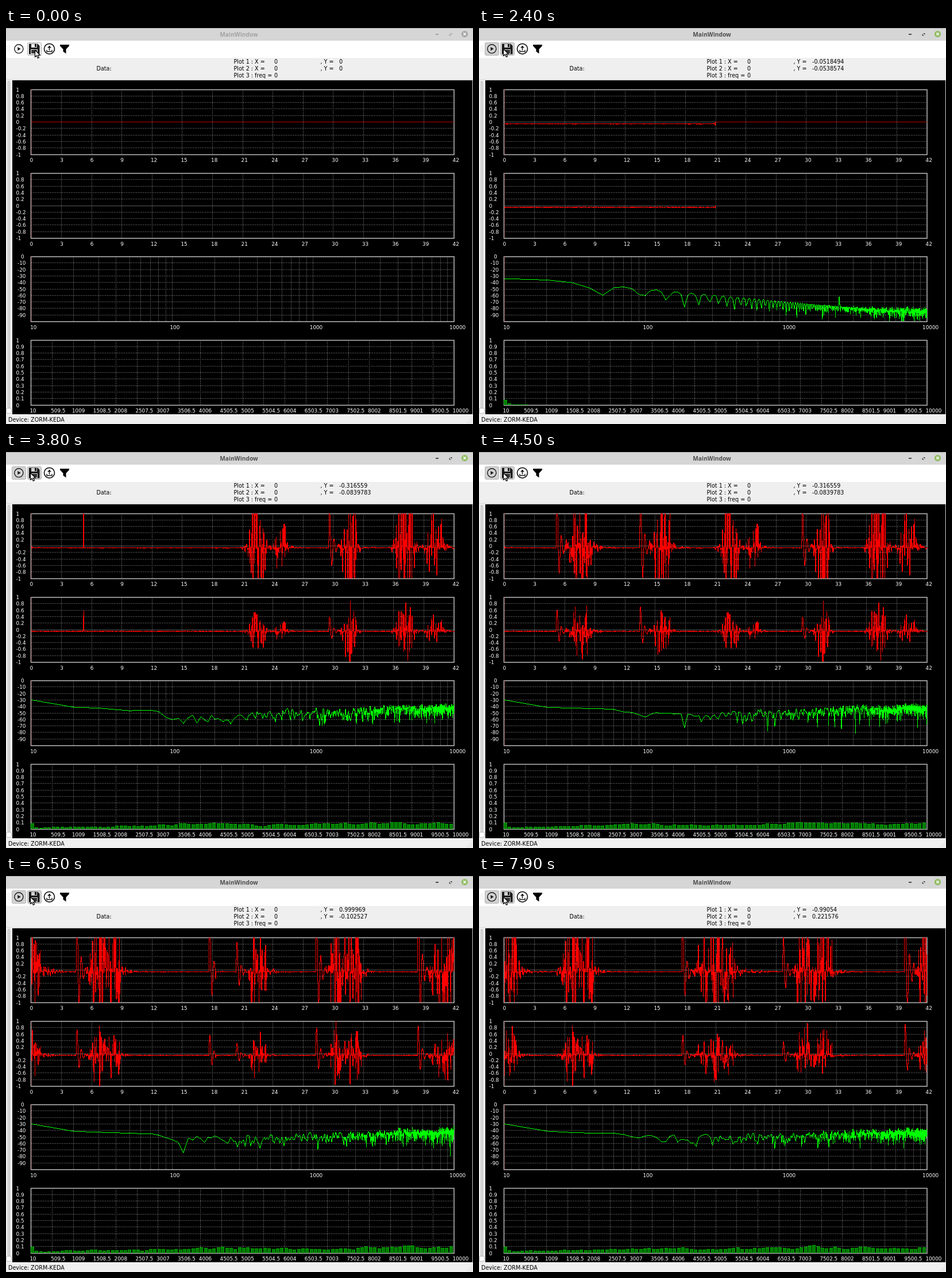
An HTML page with a canvas that plays this animation: 813 px wide and 689 px high, repeating every 8000 ms.

```html
<!DOCTYPE html>
<html>
<head>
<meta charset="utf-8">
<style>
html, body { margin: 0; width: 100%; height: 100%; overflow: hidden; background: #efefef; }
canvas { display: block; }
</style>
</head>
<body>
<canvas id="c" width="813" height="689"></canvas>
<script>
const g = document.getElementById('c').getContext('2d');
const LOOP = 8000, TICK = 100, SPAN = 42, PACKET = SPAN / 16, PERIOD = 127.5;
const L = 44, W = 736, H = 113;
const TOPS = [107, 252.5, 397.5, 543];
const SANS = '"DejaVu Sans", sans-serif';

const clamp = (v, a, b) => Math.min(b, Math.max(a, v));
const lerp = (a, b, w) => a + (b - a) * w;
const ramp = (t, a, b) => clamp((t - a) / (b - a), 0, 1);
const hash = n => { const v = Math.sin(n * 12.9898 + 4.1) * 43758.5453; return v - Math.floor(v); };

// Packets arrive steadily, with one stall while saving starts
const packetsAt = t => t < 3200
  ? clamp(Math.floor((t - 1600) / PERIOD + 1.75), 0, 8)
  : 13 + Math.floor((t - 3200) / PERIOD + .38);

// Noise bursts: start, length, strength
const BURSTS = [
  [21.4, 2.2, .7], [24, 1.6, .45], [30.8, 1.6, 1.1], [36.1, 2.2, 1], [39.2, 1.8, .9], [48.4, 2.4, 1.1],
  [56.7, 2, 1], [63.6, 1.9, 1], [71.5, 1.5, 1.2], [72.8, 2.2, 1], [81.6, 3.5, 1.1], [89.7, 1.9, 1.1],
  [91.3, 1.8, 1], [102.9, 4.2, 1], [112.9, 1.8, 1.2], [114.5, 2.3, 1], [125, 2.6, 1.1]
];

// A burst after a long silence is announced by a click
const CLICKS = BURSTS
  .filter(([a], i) => i && a - BURSTS[i - 1][0] - BURSTS[i - 1][1] > 4)
  .map(([a]) => [a - 1.25, .5 + hash(a) * .9]);

function envelope(s) {
  let amp = 0;
  for (const [a, len, k] of BURSTS) {
    const x = (s - a) / len;
    if (x < -.3 || x > 3) continue;
    const body = x > 0 && x < 1 ? Math.pow(Math.sin(Math.PI * x), .8) : 0;
    const tail = x > .5 ? .4 * Math.exp(-(x - .5) * 3) : .12 * ramp(x, -.3, 0);
    amp = Math.max(amp, k * Math.max(body, tail));
  }
  return amp;
}

function signal(s, id, gain) {
  const n = 2 * hash(id) - 1;
  let v = n * n * n * envelope(s);
  for (const [at, k] of CLICKS) {
    const d = s - at;
    if (d > 0 && d < 2) v += k * Math.sin(d * 15) * Math.exp(-d * 3.5);
  }
  return v * gain - .055 + (hash(id + .5) - .5) * .02;
}

// Newest value at sample i of the ring buffer
function sample(i, p, gain) {
  const u = i / (W * 2) * SPAN;
  const lap = Math.ceil((p - u) / SPAN) - 1;
  return lap < 0 ? 0 : signal(u + lap * SPAN, i + lap * W * 2, gain);
}

// Mean loudness: log10 of frequency, dB
const LEVEL = [[1, -30], [1.3, -41.5], [1.75, -45], [2.1, -52], [3, -50], [3.5, -45], [4, -42]];

function level(f, key) {
  const x = Math.log10(f);
  const i = clamp(LEVEL.findIndex(p => p[0] >= x), 1, LEVEL.length - 1);
  const [a, b] = [LEVEL[i - 1], LEVEL[i]];
  const swell = Math.sin(f / 700 + key * 1.9) * 1.6 * ramp(f, 200, 1500);
  return lerp(a[1], b[1], (x - a[0]) / (b[0] - a[0])) + swell;
}

// Smooth noise, near normal, over the bins
function noise(i, seed) {
  let v = 0;
  for (let k = -1; k < 2; k++)
    v += (hash((i + k) * 1.37 + seed) + hash((i + k) * 2.11 + seed + 7) - 1) * (k ? .7 : 1);
  return v * 1.22;
}

function spectrum(n) {
  const q = Math.max(0, (n - 8) / 8), a = Math.floor(q);
  const w = a ? q - a : Math.sqrt(q), len = Math.min(n, 8) * PACKET / 1000;
  const c = Math.cos(w * Math.PI / 2), s = Math.sin(w * Math.PI / 2);
  const mix = (i, d) => c * noise(i, a * 71 + d) + s * noise(i, a * 71 + 71 + d);
  return Array.from({ length: 1000 }, (_, j) => {
    const f = (j + 1) * 10, m = Math.hypot(mix(j, 0), mix(j, 33)) + 1e-4;
    const loud = k => level(f, k) + 20 * Math.log10(m) * ramp(j, 0, 14);
    if (a) return lerp(loud(a), loud(a + 1), w);
    const peak = 21 * Math.exp(-Math.pow((f - 2380) / 25, 2));
    const quiet = Math.hypot(Math.sin(Math.PI * f * len) / (Math.PI * f), m * Math.pow(10, (peak - 85) / 20));
    return lerp(20 * Math.log10(quiet), loud(1), w);
  });
}

// Crisp one pixel polyline
function trace(n, fx, fy, top, color) {
  g.fillStyle = color;
  let x0 = fx(0), y0 = fy(0);
  for (let i = 1; i < n; i++) {
    const x1 = fx(i), y1 = fy(i);
    const at = x => lerp(y0, y1, ramp(x, x0, x1));
    for (let c = Math.floor(x0); c <= Math.floor(x1) && c <= 780; c++) {
      const p = at(c), q = at(c + 1);
      const lo = Math.min(p, q), hi = Math.max(p, q);
      if (hi < top || lo > top + H) continue;
      const a = Math.floor(Math.max(lo, top)), b = Math.floor(Math.min(hi, top + H));
      g.fillRect(c, a, 1, Math.max(1, b - a));
    }
    x0 = x1; y0 = y1;
  }
}

function text(s, x, y, size, color = '#000', font = SANS, align = 'left', weight = '') {
  g.font = weight + ' ' + size + 'px ' + font;
  g.fillStyle = color;
  g.textAlign = align;
  g.textBaseline = 'alphabetic';
  g.fillText(s, x, y + size * .36);
}

function box(x, y, w, h, color) { g.fillStyle = color; g.fillRect(x, y, w, h); }

function round(x, y, w, h, r, fill, stroke) {
  g.beginPath();
  g.roundRect(x, y, w, h, r);
  g.fillStyle = fill;
  g.fill();
  g.strokeStyle = stroke;
  g.lineWidth = 1;
  g.stroke();
}

function line(pts, color, width = 1, fill) {
  g.beginPath();
  pts.forEach(([x, y], i) => i ? g.lineTo(x, y) : g.moveTo(x, y));
  if (fill) { g.closePath(); g.fillStyle = fill; g.fill(); }
  if (color) { g.strokeStyle = color; g.lineWidth = width; g.stroke(); }
}

function circle(x, y, r, fill, stroke, width = 1.5) {
  g.beginPath();
  g.arc(x, y, r, 0, 7);
  if (fill) { g.fillStyle = fill; g.fill(); }
  if (stroke) { g.strokeStyle = stroke; g.lineWidth = width; g.stroke(); }
}

function dotted(x0, y0, x1, y1, color = '#a0a0a0') {
  g.setLineDash([1, 2]);
  line([[x0, y0], [x1, y1]], color);
  g.setLineDash([]);
}

function axes(k, xs) {
  const top = TOPS[k], px = v => Math.floor(v) + .5;
  for (let i = 1; i < 10; i++) {
    const y = px(top + i * H / 10);
    if (k < 2 && i === 5) line([[L, y], [L + W, y]], '#585858');
    else dotted(L, y, L + W, y);
  }
  xs.forEach(x => dotted(px(x), top, px(x), top + H));
  g.strokeStyle = '#b0b0b0';
  g.lineWidth = 1.6;
  g.strokeRect(43.5, top + .4, 736.5, H);
  if (k < 3) dotted(44.5, top, 44.5, top + H, '#b00000');
  for (let i = 0; i <= 10; i++) {
    if (k === 2 && i === 10) break;
    const s = k === 2 ? -10 * i : k === 3 ? 1 - i / 10 : 1 - i / 5;
    text(String(+s.toFixed(1) || 0), k === 2 ? (i ? 20 : 26) : 17.5, top + .4 + i * H / 10, 8.8, '#fff');
  }
}

function grids() {
  const steps = (count, d) => Array.from({ length: count }, (_, i) => L + (i + 1) * d);
  const label = (s, x, k) => text(String(s), x, TOPS[k] + H + 10.1, 8.8, '#fff');
  for (let k = 0; k < 2; k++) {
    axes(k, steps(13, W / 14));
    for (let i = 0; i < 15; i++) label(i * 3, L + i * W / 14 - 2.4, k);
  }
  const logs = [];
  for (let d = 0; d < 3; d++)
    for (let m = 1; m < 10; m++) if (d + m > 1) logs.push(L + (d + Math.log10(m)) * W / 3);
  axes(2, logs);
  for (let d = 0; d < 4; d++) label(10 ** (d + 1), 42.2 + 243.3 * d, 2);
  axes(3, steps(19, W / 20));
  for (let i = 0; i < 21; i++) label(10 + i * 499.5, L + i * W / 20 - 2.6, 3);
}

function bars(db) {
  const base = Math.floor(TOPS[3] + H), amp = db.map(v => Math.pow(10, v / 20));
  for (let k = 0; k < 100; k++) {
    // Neighbouring bands smooth each bar
    const part = amp.slice(k ? k * 10 - 8 : 0, k ? k * 10 + 18 : 10);
    const h = Math.round(part.reduce((a, b) => a + b) / part.length * 12.3 * H);
    const x = Math.round(43 + k * W / 100);
    if (h) box(x, base - h, 6, h, '#00a400');
    if (h > 2) box(x + 1, base - h + 1, 4, h - 1, '#007a00');
  }
}

function plots(n) {
  const p = n * PACKET, end = Math.round(Math.min(p / SPAN, 1) * W);
  box(11, 91, 801, 581, '#000');
  grids();
  if (end < W) box(L + end, 163, W - end, 1, '#b40000');
  if (!n) return;
  [2.4, .95].forEach((gain, k) => trace(end * 2 + 1, i => L + i / 2,
    i => TOPS[k] + (1 - sample(i, p, gain)) * H / 2, TOPS[k], '#f00'));
  const db = spectrum(n);
  trace(1000, i => L + Math.log10(i + 1) * W / 3, i => TOPS[2] - db[i] * H / 100, TOPS[2], '#0f0');
  bars(db);
}

function titleBar(active) {
  const ink = active ? '#4c4c4c' : '#a2a2a2';
  box(0, 0, 813, 22, '#d6d6d6');
  box(0, 0, 813, 1, '#a8a8a8');
  text('MainWindow', 405.5, 11.5, 10.2, ink, '"Noto Sans", sans-serif', 'center', 'bold');
  box(748, 10, 5, 2, ink);
  line([[773, 9], [776.5, 9], [776.5, 12]], null, 1, ink);
  line([[771.5, 10], [771.5, 13.5], [775, 13.5]], null, 1, ink);
  circle(798.5, 10.5, 5.6, active ? '#91bb62' : '#a6a6a6');
  line([[796.3, 8.3], [800.7, 12.7]], '#fff', 1.4);
  line([[800.7, 8.3], [796.3, 12.7]], '#fff', 1.4);
}

const FILL = ['#fff', '#f0f0f0', '#d2d2d2'];

function toolBar(play, save) {
  const ink = '#1a1a1a', paper = FILL[save];
  box(0, 22, 813, 30, '#fff');
  for (let i = 0; i < 8; i++) box(3 + i % 2 * 3, 31 + (i >> 1) * 3, 1, 1, '#c0c0c0');
  if (play) round(10.5, 25.5, 24, 22, 2, FILL[play], '#b2b2b2');
  if (save) round(37.5, 25.5, 24, 22, 2, paper, '#b2b2b2');

  circle(22.3, 36.3, 7.6, null, ink, 1.4);
  line([[20.3, 33], [20.3, 39.6], [25.6, 36.3]], null, 1, ink);

  line([[40, 27.5], [55, 27.5], [58.5, 31], [58.5, 45.5], [40, 45.5]], null, 1, ink);
  box(44, 28, 10, 6, paper);
  box(50, 28, 3, 5, ink);
  box(43, 37, 12, 8, paper);
  box(44, 38, 10, 6, '#333');

  circle(75.5, 36.3, 9, null, ink, 1.7);
  line([[75.5, 39], [75.5, 32]], ink, 1.5);
  line([[72, 34.5], [75.5, 30.5], [79, 34.5]], null, 1, ink);
  line([[71, 38], [71, 41], [80, 41], [80, 38]], ink, 1.4);
  line([[94, 29], [110, 29], [110, 31], [104.5, 37], [104.5, 44.5], [99.5, 41], [99.5, 37], [94, 31]], null, 1, '#000');
}

// Readouts, one pair for each lap of the buffer
const READS = [['0', '0'], ['-0.0518494', '-0.0538574'], ['-0.316559', '-0.0839783'],
  ['0.999969', '-0.102527'], ['-0.99054', '0.221576']];

function info(n) {
  box(0, 52, 813, 39, '#efefef');
  box(0, 89, 813, 1, '#dadada');
  const put = (s, x, y) => text(s, x, y, 9.6);
  put('Data:', 157.5, 70.5);
  READS[Math.ceil(n / 16)].forEach((v, i) => {
    const y = 58.5 + i * 12;
    put('Plot ' + (i + 1) + ' : X =', 396.5, y);
    put('0', 467, y);
    put(', Y =', 547.5, y);
    put(v, 580, y);
  });
  put('Plot 3 : freq =', 396.5, 82.5);
  put('0', 467, 82.5);
}

function frame() {
  box(0, 90, 11, 582, '#efefef');
  box(812, 90, 1, 582, '#d0d0d0');
  round(3.5, 92.5, 3, 570, 1.5, '#e0e0e0', '#b8b8b8');
  round(.5, 661.5, 9, 9, 2, '#fff', '#b8b8b8');
  box(0, 672, 813, 17, '#efefef');
  text('Device: ZORM-KEDA', 4, 681.5, 9.6);
  for (let i = 0; i < 3; i++)
    for (let j = 0; j <= i; j++) box(809 - j * 3, 680 + i * 3, 1, 1, '#b0b0b0');
}

function arrow(x, y) {
  g.save();
  g.translate(x + .5, y + .5);
  line([[0, 0], [0, 12], [2.8, 9.6], [4.8, 14], [7, 13], [5, 8.8], [8.8, 8.8], [0, 0]], '#000', 1.2, '#fff');
  g.restore();
}

function draw(t) {
  const n = packetsAt(t);
  const away = ramp(t, 800, 1200), back = ramp(t, 1600, 2100);
  const x = 50 - 27 * away + 19 * back, y = 38 - away - back;
  const over = left => x >= left && x < left + 25 ? 1 : 0;
  titleBar(t >= 1400);
  toolBar(t >= 1500 ? 2 : over(10), t >= 2200 ? 2 : over(37));
  info(n);
  plots(n);
  frame();
  arrow(x, y);
}

let last = -1;
const start = performance.now();
function loop() {
  const t = Math.floor((performance.now() - start) % LOOP / TICK) * TICK;
  if (t !== last) draw(last = t);
  requestAnimationFrame(loop);
}
loop();
</script>
</body>
</html>
```
